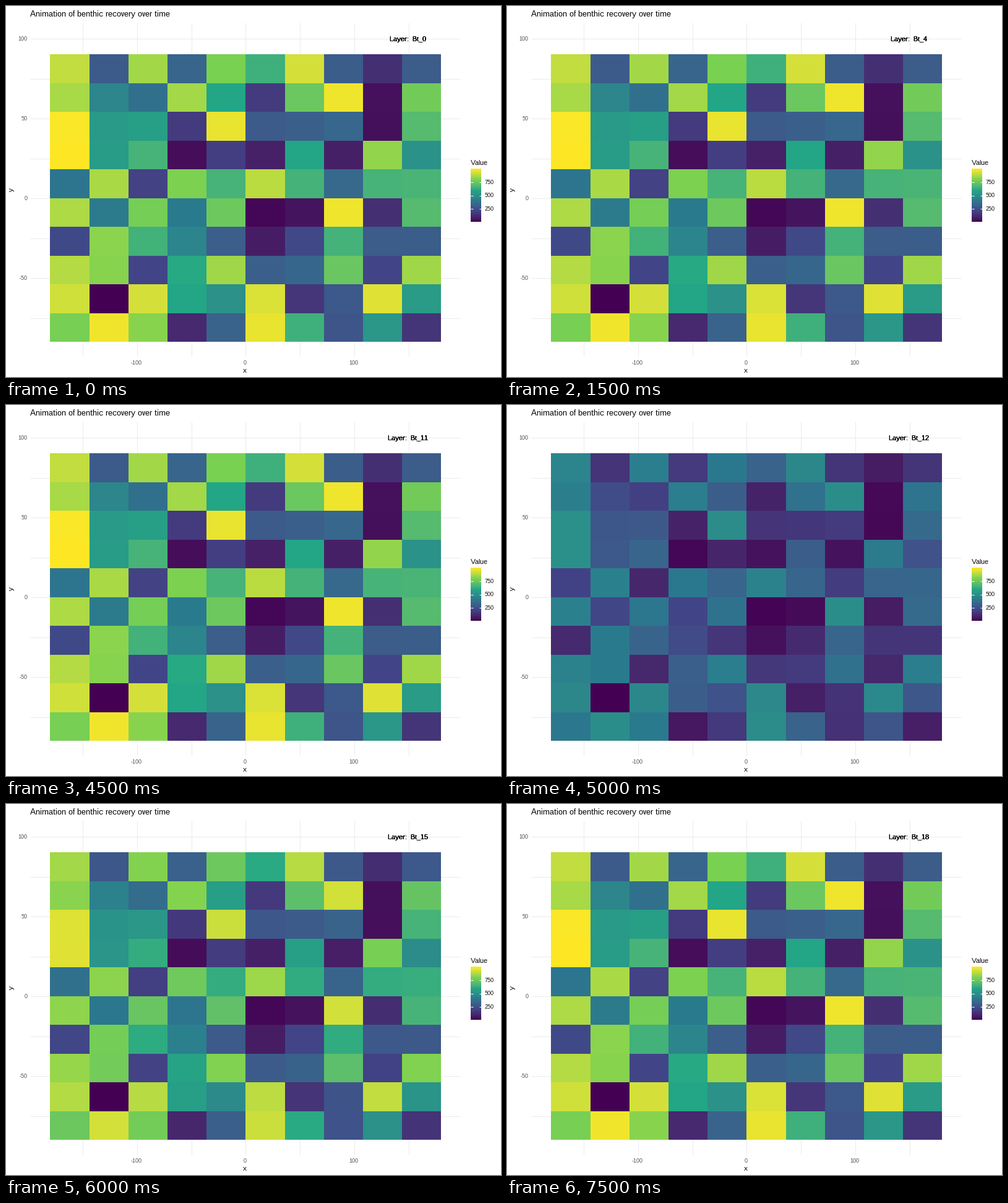
Animation, 800 px wide and 600 px high, one loop 8000 ms. Source, as a matplotlib script:

```python
import matplotlib.pyplot as plt
import numpy as np
from matplotlib.animation import FuncAnimation
from matplotlib.colors import ListedColormap

plt.rcParams.update({
    "font.family": "Liberation Sans",
    "text.hinting": "native",
    "text.hinting_factor": 1,
})

W, H, DPI = 800, 600, 100
PX = 72 / DPI
FRAMES, STEP_MS = 16, 500
GRID, TICK = "#EBEBEB", "#4D4D4D"
STOPS = ["#440154", "#414487", "#2A788E", "#22A884", "#7AD151", "#FDE725"]

# Benthic status of each cell at full recovery, north to south
STATUS = np.array([
    [900, 288, 853, 327, 797, 640, 930, 295, 125, 291],
    [862, 460, 370, 855, 590, 168, 750, 975, 32, 772],
    [994, 542, 558, 166, 965, 285, 302, 335, 30, 690],
    [999, 550, 655, 25, 180, 78, 590, 76, 830, 510],
    [390, 865, 192, 803, 655, 890, 650, 341, 655, 660],
    [870, 415, 783, 410, 757, 12, 41, 975, 125, 690],
    [218, 820, 645, 455, 299, 66, 217, 650, 290, 295],
    [880, 816, 204, 605, 850, 304, 332, 745, 205, 850],
    [925, 1, 930, 590, 503, 940, 149, 276, 948, 545],
    [790, 978, 817, 104, 320, 965, 640, 266, 530, 145],
])

RGB_XYZ = np.array([[0.4124, 0.3576, 0.1805],
                    [0.2126, 0.7152, 0.0722],
                    [0.0193, 0.1192, 0.9505]])
WHITE = RGB_XYZ.sum(axis=1)
XYZ_LAB = np.array([[0, 116, 0], [500, -500, 0], [0, 200, -200]])


def to_lab(rgb):
    lin = np.where(rgb > 0.04045, ((rgb + 0.055) / 1.055) ** 2.4, rgb / 12.92)
    xyz = lin @ RGB_XYZ.T / WHITE
    f = np.where(xyz > 0.008856, np.cbrt(xyz), 7.787 * xyz + 16 / 116)
    return f @ XYZ_LAB.T - [16, 0, 0]


def to_rgb(lab):
    f = (lab + [16, 0, 0]) @ np.linalg.inv(XYZ_LAB).T
    xyz = np.where(f > 0.2069, f ** 3, (f - 16 / 116) / 7.787) * WHITE
    lin = np.clip(xyz @ np.linalg.inv(RGB_XYZ).T, 0, 1)
    return np.where(lin > 0.0031308, 1.055 * lin ** (1 / 2.4) - 0.055, 12.92 * lin)


def lab_gradient(stops, n=1000):
    rgb = np.array([[int(s[i:i + 2], 16) / 255 for i in (1, 3, 5)] for s in stops])
    lab = to_lab(rgb)
    t, knots = np.linspace(0, 1, n), np.linspace(0, 1, len(stops))
    mix = np.column_stack([np.interp(t, knots, ch) for ch in lab.T])
    return ListedColormap(np.clip(to_rgb(mix), 0, 1))


def x_px(lon):
    return 386.9 + lon * 1.7556


def y_px(lat):
    return 310.6 - lat * 2.58


def text(x, y, s, size, color="black", **kw):
    return ax.text(x, y, s, fontsize=size * PX, color=color, va="baseline", **kw)


def layer_at(frame):
    return int(np.round(1.22 * frame))


def recovery(layer):
    """Disturbance halves the status at layer 12; it heals by layer 16."""
    if layer < 12:
        return 1.0
    left = max(16 - layer, 0)
    return 1 - 0.025 * left * (left + 1)


fig = plt.figure(figsize=(W / DPI, H / DPI), dpi=DPI, facecolor="white")
ax = fig.add_axes([0, 0, 1, 1])
ax.set(xlim=(0, W), ylim=(H, 0))
ax.axis("off")

cmap = lab_gradient(STOPS)
fill = dict(cmap=cmap, vmin=1, vmax=999, antialiased=False, linewidth=0)

# Panel grid
for lon in range(-150, 151, 50):
    ax.vlines(np.floor(x_px(lon)) + 0.5, 27, 567, colors=GRID, lw=PX)
for lat in range(-75, 101, 25):
    ax.hlines(np.floor(y_px(lat)) + 0.5, 39, 734, colors=GRID, lw=PX)

# Raster
cols = np.ceil(71 + 63.2 * np.arange(11) - 1e-6)
rows = np.ceil(78 + 46.5 * np.arange(11) - 1e-6)
tiles = ax.pcolormesh(cols, rows, STATUS, zorder=3, **fill)

# Axis labels and titles
for lon in (-100, 0, 100):
    text(x_px(lon) - 0.5, 580, str(lon), 9, TICK, ha="center")
for lat in (100, 50, 0, -50):
    text(34.4, round(y_px(lat) + 3.2), str(lat), 9, TICK, ha="right")
text(386, 593, "x", 11, ha="center")
ax.text(12, 297, "y", fontsize=11 * PX, rotation=90, ha="right", va="center",
        rotation_mode="default").set_x(14)
text(39, 17, "Animation of benthic recovery over time", 13)

# Colour bar
text(751, 257, "Value", 11)
ramp = np.linspace(999, 1, 86)[:, None]
ax.pcolormesh([751, 768], 263 + np.arange(87), ramp, zorder=3, **fill)
for value in (750, 500, 250):
    y = 263 + 86 * (999 - value) / 998
    ax.hlines([np.floor(y) + 0.5] * 2, [751, 764.5], [754.5, 768],
              colors="white", lw=PX, zorder=4)
    text(774, round(y + 3.2), str(value), 9)

# Overprinted label, so its edges come out heavy
labels = [text(649.5, 57, "", 11, ha="center", zorder=5) for _ in range(4)]


def update(frame):
    layer = layer_at(frame)
    tiles.set_array(STATUS * recovery(layer))
    for label in labels:
        label.set_text(f"Layer:  Bt_{layer}")
    return [tiles, *labels]


anim = FuncAnimation(fig, update, frames=FRAMES, interval=STEP_MS,
                     repeat=True, repeat_delay=0, blit=False)
plt.show()
```
